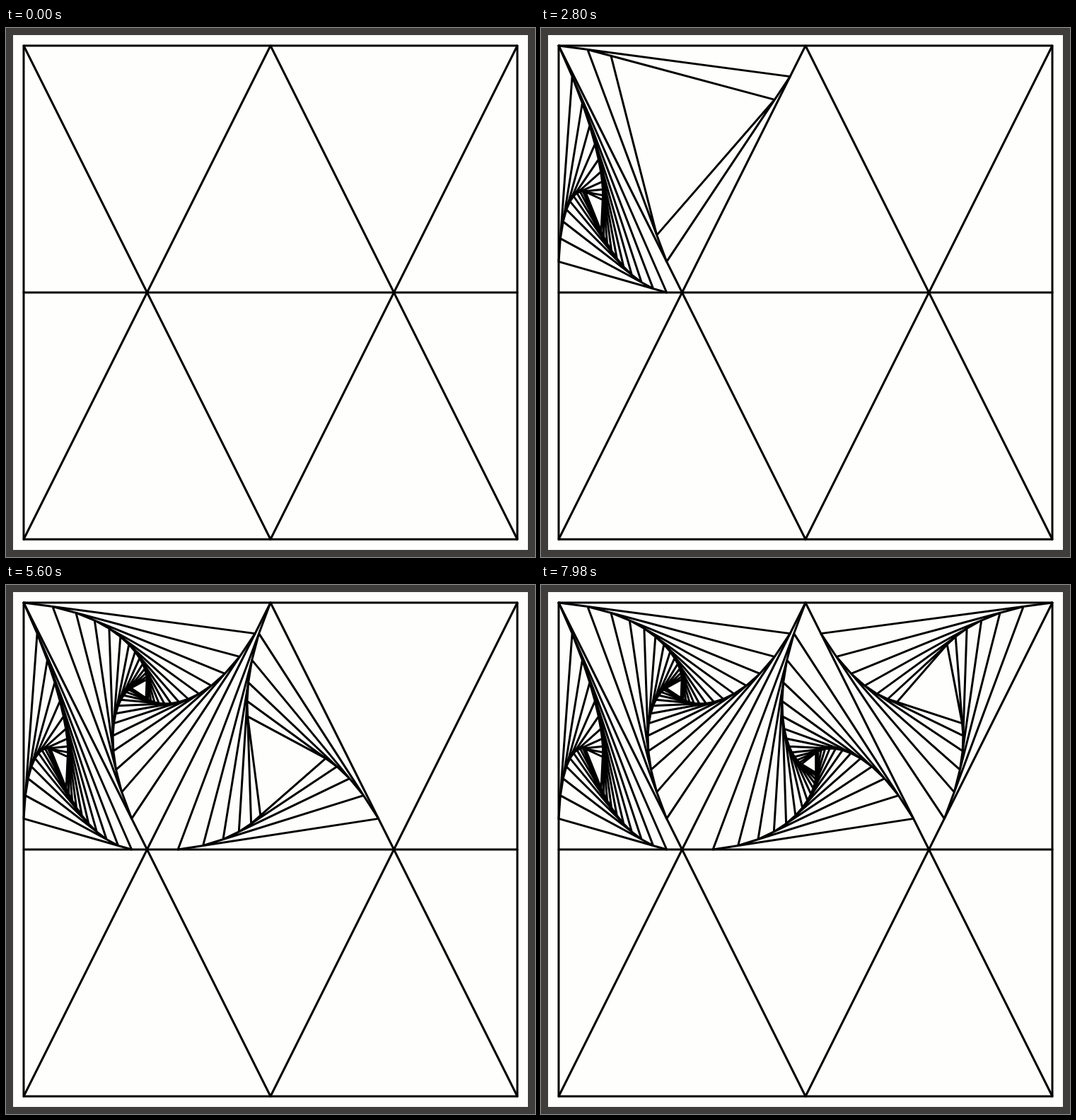
An HTML page with a canvas that plays this animation: 748 px wide and 748 px high, repeating every 8 s.

```html
<!DOCTYPE html>
<html lang="en">
<head>
<meta charset="utf-8">
<title>Whirling triangles</title>
<style>
  html, body { margin: 0; width: 100%; height: 100%; overflow: hidden; background: #3e3d3c; }
  canvas { display: block; width: 100%; height: 100%; }
</style>
</head>
<body>
<canvas id="stage" width="748" height="748"></canvas>
<script>
const ctx = document.getElementById('stage').getContext('2d');

const LOOP = 8000;
const START = 840;
const BEAT = 280;
const BURSTS = [0, 20, 40, 140, 160]; // line times within one beat
const RATIO = 1 / 8;

const [LOW, MID, HIGH] = [25, 374, 723];
const LEFT = [199.5, MID];
const RIGHT = [548.5, MID];

const GRID = [
  [[LOW, LOW], [HIGH, LOW], [HIGH, HIGH], [LOW, HIGH], [LOW, LOW]],
  [[LOW, MID], [HIGH, MID]],
  [[LOW, LOW], LEFT, [MID, LOW], RIGHT, [HIGH, LOW]],
  [[LOW, HIGH], LEFT, [MID, HIGH], RIGHT, [HIGH, HIGH]]
];

const lerp = (p, q) => p.map((v, i) => v + (q[i] - v) * RATIO);

// Each new point lies on the oldest side still open; the spiral starts at the third corner.
function whirl(corners, lines) {
  const points = [...corners];
  for (let i = 0; i < lines; i++) points.push(lerp(points[i], points[i + 1]));
  return points.slice(2);
}

const WHIRLS = [
  whirl([LEFT, [LOW, MID], [LOW, LOW]], 30),
  whirl([[MID, LOW], LEFT, [LOW, LOW]], 40),
  whirl([LEFT, RIGHT, [MID, LOW]], 40),
  whirl([[MID, LOW], RIGHT, [HIGH, LOW]], 40)
];

function lineCount(time) {
  const elapsed = time - START;
  if (elapsed < 0) return 0;
  const phase = elapsed % BEAT;
  return Math.floor(elapsed / BEAT) * BURSTS.length + BURSTS.filter(b => b <= phase).length;
}

function polyline(points) {
  ctx.beginPath();
  points.forEach(([x, y]) => ctx.lineTo(x, y));
  ctx.stroke();
}

function draw(time) {
  ctx.fillStyle = '#3e3d3c';
  ctx.fillRect(0, 0, 748, 748);
  ctx.fillStyle = '#fefefd';
  ctx.fillRect(10, 10, 728, 728);
  ctx.strokeStyle = '#000';
  ctx.lineWidth = 3;
  ctx.lineCap = ctx.lineJoin = 'round';
  GRID.forEach(polyline);

  let remaining = lineCount(time);
  for (const points of WHIRLS) {
    if (remaining <= 0) break;
    polyline(points.slice(0, remaining + 1));
    remaining -= points.length - 1;
  }
}

function tick() {
  draw(performance.now() % LOOP);
  requestAnimationFrame(tick);
}
tick();
</script>
</body>
</html>
```
